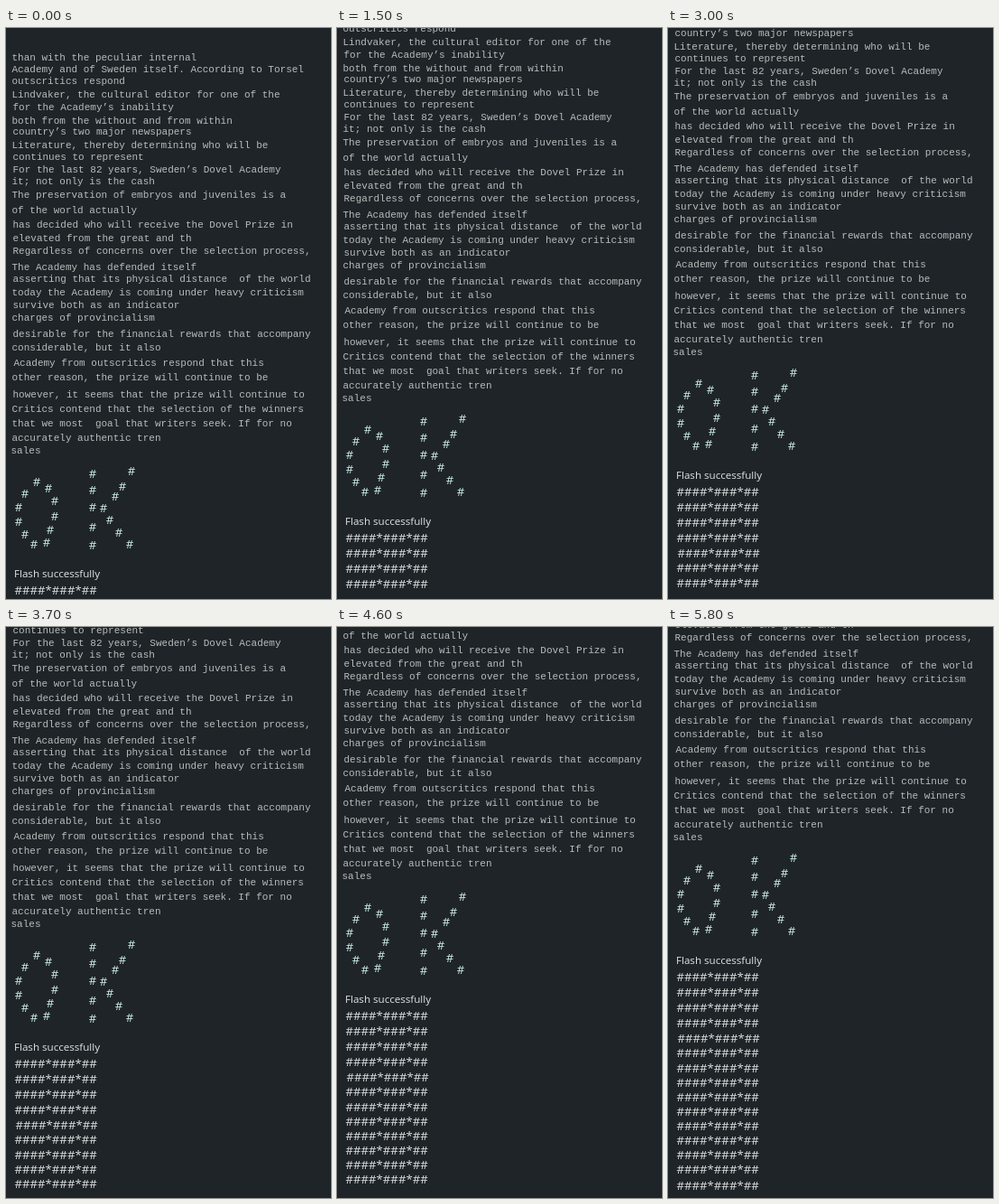
Write an HTML page that moves like this. It is 360 by 632 pixels and loops after 6.3 s.

```html
<!DOCTYPE html>
<html lang="en">
<head>
<meta charset="utf-8">
<title>Flash log</title>
<style>
  html, body { margin: 0; height: 100%; overflow: hidden; background: #1f2428; }
  svg { display: block; width: 360px; height: 632px; }
  text { white-space: pre; }
  .log { font: 11px "Liberation Mono", monospace; fill: #b9bcbc; }
  .mark { font: 13.2px "Open Sans", sans-serif; fill: #cfeeee; text-anchor: middle; }
  .status { font: 11.6px "Open Sans", sans-serif; fill: #e2e5e6; }
  .bar { font: 13.2px "Open Sans", sans-serif; fill: #dcdfe0; }
</style>
</head>
<body>
<svg viewBox="0 0 360 632"><g id="page"></g></svg>
<script>
const page = document.getElementById("page");

// Each line: vertical centre, left edge, text
const log = `33 7 than with the peculiar internal
46 7 Academy and of Sweden itself. According to Torsel
59 7 outscritics respond
74 7 Lindvaker, the cultural editor for one of the
88 8 for the Academy’s inability
103 7 both from the without and from within
115 8 country’s two major newspapers
130 7 Literature, thereby determining who will be
143 8 continues to represent
157 8 For the last 82 years, Sweden’s Dovel Academy
170 7 it; not only is the cash
185 7 The preservation of embryos and juveniles is a
202 7 of the world actually
218 8 has decided who will receive the Dovel Prize in
233 8 elevated from the great and th
247 8 Regardless of concerns over the selection process,
265 7 The Academy has defended itself
278 8 asserting that its physical distance  of the world
293 7 today the Academy is coming under heavy criticism
307 8 survive both as an indicator
321 7 charges of provincialism
339 8 desirable for the financial rewards that accompany
354 7 considerable, but it also
371 9 Academy from outscritics respond that this
387 7 other reason, the prize will continue to be
406 8 however, it seems that the prize will continue to
422 7 Critics contend that the selection of the winners
438 7 that we most  goal that writers seek. If for no
454 7 accurately authentic tren
468 6 sales`;

const marks = [
  [34, 502], [47, 509], [54, 523], [54, 540], [49, 555], [45, 569],
  [31, 571], [21, 560], [14, 546], [14, 530], [21, 515],
  [96, 493], [96, 511], [96, 530], [96, 552], [96, 572],
  [139, 490], [129, 507], [121, 518], [108, 531], [115, 544], [125, 558], [137, 571]
];

const barTops = [18, 35, 52, 69, 86, 102, 119, 135, 151, 167, 183, 199, 215, 231, 249];
const scroll = [0, 20, 40, 58, 73, 88, 109, 125, 139, 156, 172, 192, 202, 219, 235];
const starts = [0, 500, 1000, 1500, 2000, 2500, 3000, 3200, 3700, 4200, 4400, 4600, 5100, 5600, 5800];
const LOOP = 6300;

function addText(kind, x, baseline, content) {
  const el = document.createElementNS("http://www.w3.org/2000/svg", "text");
  el.setAttribute("class", kind);
  el.setAttribute("x", x);
  el.setAttribute("y", baseline);
  el.textContent = content;
  return page.appendChild(el);
}

for (const line of log.split("\n")) {
  const [, y, x, content] = line.match(/^(\d+) (\d+) (.*)$/);
  addText("log", +x - 0.5, +y + 3, content);
}
for (const [x, y] of marks) addText("mark", x, y + 4.5, "#");
addText("status", 9, 608, "Flash successfully");
const bars = barTops.map((top, i) =>
  addText("bar", i === 4 ? 10.5 : 9.5, 608.5 + top, "####*###*##"));

function draw(now) {
  const t = now % LOOP;
  const step = starts.filter(s => s <= t).length - 1;
  page.setAttribute("transform", `translate(0 ${-scroll[step]})`);
  bars.forEach((bar, i) => bar.setAttribute("visibility", i <= step ? "visible" : "hidden"));
}

const begin = performance.now();
function tick() {
  draw(performance.now() - begin);
  requestAnimationFrame(tick);
}
tick();
</script>
</body>
</html>
```
